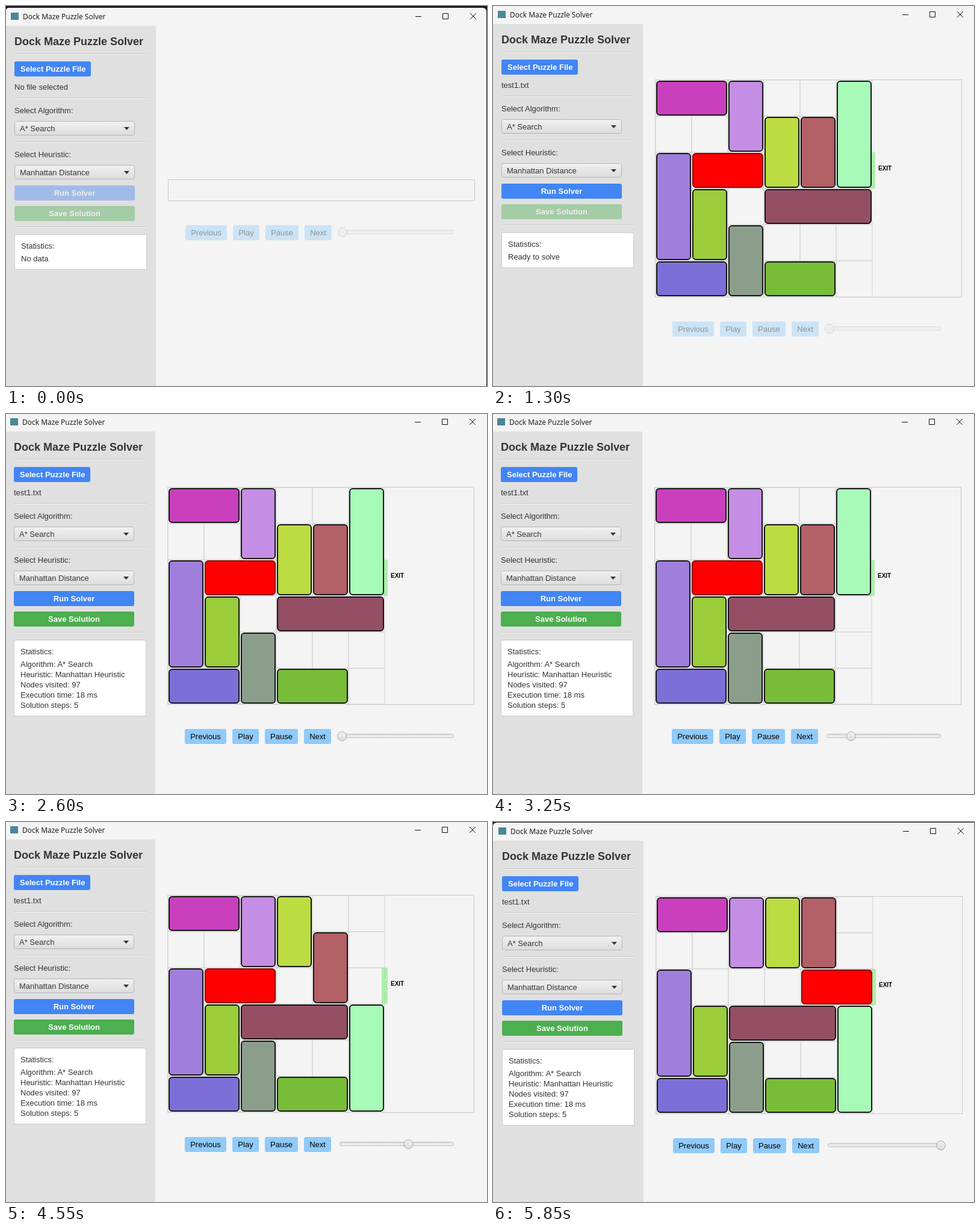
Recreate the animation shown at these times as an HTML page. Size 799 px wide and 631 px high, loop 6.5 s.

```html
<!DOCTYPE html>
<html lang="en">
<head>
<meta charset="utf-8">
<title>Dock Maze Puzzle Solver</title>
<style>
  html, body { margin: 0; width: 100%; height: 100%; overflow: hidden; background: #1d1c24; }
  svg { display: block; font: 13px "Liberation Sans", Arial, sans-serif; fill: #333; }
  .caption { font: 12px "Open Sans", "Noto Sans", sans-serif; fill: #111; }
  .bold { font-weight: bold; }
  .white { fill: #fff; }
  .mid { text-anchor: middle; }
</style>
</head>
<body>
<svg id="stage" width="799" height="631" viewBox="0 0 799 631">
  <defs>
    <linearGradient id="raised" x2="0" y2="1">
      <stop stop-color="#f1f1f1"/><stop offset="1" stop-color="#dcdcdc"/>
    </linearGradient>
    <linearGradient id="sunken" x2="0" y2="1">
      <stop stop-color="#dedede"/><stop offset="1" stop-color="#f2f2f2"/>
    </linearGradient>
    <filter id="shadow" x="-10%" y="-20%" width="120%" height="160%">
      <feDropShadow dx="0" dy="3" stdDeviation="4" flood-opacity=".4"/>
    </filter>
  </defs>
  <g id="view"></g>
</svg>
<script>
const STEP_MS = 650;
const APP_NAME = "Dock Maze Puzzle Solver";

// The recorded window wobbles by a few pixels: dx, dy per step.
// "move" is how many solution moves are on the board.
const states = [
  { dx: 1, dy: 4, empty: true, right: 798 },
  { dx: 3, dy: 2 },
  { dx: 1, dy: 1 },
  { dx: -1, dy: 1, menu: true },
  { dx: 0, dy: 0, move: 0 },
  { dx: 0, dy: 0, move: 1 },
  { dx: 0, dy: 0, move: 2 },
  { dx: 0, dy: 0, move: 3 },
  { dx: -1, dy: 1, move: 4 },
  { dx: 2, dy: 2, move: 5 }
];

// column, row, columns wide, rows high, colour
const cars = {
  magenta: [0, 0, 2, 1, "#c93fbe"],
  lilac: [2, 0, 1, 2, "#c38ee3"],
  lime: [3, 1, 1, 2, "#bcdc42"],
  brick: [4, 1, 1, 2, "#b46067"],
  mint: [5, 0, 1, 3, "#a8fab8"],
  violet: [0, 2, 1, 3, "#a07edc"],
  red: [1, 2, 2, 1, "#ff0000"],
  olive: [1, 3, 1, 2, "#9bcc3c"],
  maroon: [3, 3, 3, 1, "#944f64"],
  sage: [2, 4, 1, 2, "#8b9e8b"],
  blue: [0, 5, 2, 1, "#7c70d8"],
  green: [3, 5, 2, 1, "#78bd38"]
};
const moves = [["maroon", -1, 0], ["mint", 0, 3], ["lime", 0, -1], ["brick", 0, -1], ["red", 3, 0]];

const rect = (x, y, w, h, fill, extra = "") =>
  `<rect x="${x}" y="${y}" width="${w}" height="${h}" fill="${fill}" ${extra}/>`;
const text = (x, y, str, cls = "", extra = "") =>
  `<text x="${x}" y="${y}" class="${cls}" ${extra}>${str}</text>`;
const group = (content, attrs) => `<g ${attrs}>${content}</g>`;
const dim = (content, disabled) => group(content, `opacity="${disabled ? 0.4 : 1}"`);
const separator = y => rect(13, y, 221, 1, "#cacaca") + rect(13, y + 1, 221, 1, "#f4f4f4");

const wideButton = (y, label, fill, disabled) =>
  dim(rect(13, y, 200, 25, fill, 'rx="3"') + text(113, y + 17, label, "bold white mid"), disabled);

const comboBox = (y, label, focused) =>
  rect(13.5, y + .5, 199, 23, "url(#raised)",
    `rx="3" stroke="${focused ? "#039ed3" : "#b4b4b4"}" stroke-width="${focused ? 1.6 : 1}"`) +
  text(22, y + 17, label) +
  `<path d="M195 ${y + 10}h9l-4.5 5z"/>`;

function titleBar() {
  return rect(7, 7, 13, 12, "#4b8797") +
    text(27, 18, APP_NAME, "caption") +
    `<path d="M679 13.5h10M724.5 8.5h9v9h-9zM770 8l10 10M780 8l-10 10" fill="none" stroke="#111"/>`;
}

function statistics({ empty, move }) {
  const solved = move !== undefined;
  const lines = solved
    ? ["Algorithm: A* Search", "Heuristic: Manhattan Heuristic", "Nodes visited: 97",
       "Execution time: 18 ms", "Solution steps: 5"]
    : [empty ? "No data" : "Ready to solve"];
  return rect(13.5, 375.5, 219, solved ? 126 : 58, "#fff", 'stroke="#ccc"') +
    text(24, 399, "Statistics:") +
    lines.map((line, i) => text(24, 420 + 17 * i, line)).join("");
}

function menu() {
  return group(rect(13, 284, 199, 50, "#fff", 'stroke="#bcbcbc" stroke-width=".6"'), 'filter="url(#shadow)"') +
    rect(13, 285, 198, 24, "#0096c9") +
    text(19, 302, "Manhattan Distance", "white") +
    text(19, 326, "Blocking Cars");
}

function sidebar(state) {
  return rect(-9, 29, 257, 640, "#e0e0e0") +
    text(13, 61, APP_NAME, "bold", 'font-size="18"') +
    separator(75) +
    rect(13, 88, 127, 25, "#4285f4", 'rx="3"') +
    text(23, 105, "Select Puzzle File", "bold white") +
    text(13, 135, state.empty ? "No file selected" : "test1.txt") +
    separator(148) +
    text(13, 174, "Select Algorithm:") +
    comboBox(187, "A* Search") +
    separator(221) +
    text(13, 247, "Select Heuristic:") +
    comboBox(260, "Manhattan Distance", state.menu) +
    wideButton(294, "Run Solver", "#4285f4", state.empty) +
    wideButton(328, "Save Solution", "#4caf50", state.move === undefined) +
    separator(362) +
    statistics(state) +
    (state.menu ? menu() : "");
}

function board({ empty, move = 0 }) {
  const frame = 'stroke="#c8c8c8"';
  if (empty) return rect(268.5, 284.5, 509, 35, "none", frame);
  const cell = n => 60 * n;
  let out = rect(268.5, 121.5, 509, 361, "none", frame);
  for (let i = 0; i < 36; i++)
    out += rect(269 + cell(i % 6), 122 + cell(Math.floor(i / 6)), 60, 60, "none", 'stroke="#d3d3d3"');
  out += rect(624, 242, 10, 60, "#90ee90", 'opacity=".7"') +
    text(639, 272, "EXIT", "bold", 'font-size="10" style="fill:#000"');
  for (const [name, [col, row, w, h, fill]] of Object.entries(cars)) {
    let x = col, y = row;
    for (const [mover, dx, dy] of moves.slice(0, move))
      if (mover === name) { x += dx; y += dy; }
    const edge = name === "red" ? "#8b0000" : "#161616";
    out += rect(271 + cell(x), 124 + cell(y), cell(w) - 4, cell(h) - 4, fill,
      `rx="5" stroke="${edge}" stroke-width="2"`);
  }
  return out;
}

function controls({ empty, move }) {
  const button = (x, w, label) =>
    rect(x, 523, w, 25, "#90caf9", 'rx="3"') + text(x + w / 2, 540, label, "mid", 'style="fill:#000"');
  const knobX = 558 + 36.8 * (move || 0);
  const content = button(297, 69, "Previous") + button(376, 44, "Play") +
    button(430, 55, "Pause") + button(495, 45, "Next") +
    rect(554.5, 531.5, 189, 6, "url(#sunken)", 'rx="3" stroke="#bcbcbc"') +
    `<circle cx="${knobX}" cy="535" r="7.5" fill="url(#raised)" stroke="#a8a8a8"/>`;
  return group(dim(content, move === undefined), `transform="translate(0 ${empty ? -163 : 0})"`);
}

function render(state) {
  const left = state.dx - 2, top = state.dy - 1, right = state.right || 810;
  return rect(left, top, right - left, 660, "#f4f4f4", 'rx="6"') +
    (left < 0 ? rect(0, Math.max(top, 0) + 6, 6, 640, "#f4f4f4") : "") +
    (top < 1 ? rect(0, 0, 799, 12, "#f4f4f4") : "") +
    group(titleBar() + sidebar(state) + board(state) + controls(state),
      `transform="translate(${state.dx} ${state.dy})"`) +
    (left > 0 ? rect(0, 0, left, 631, "#1d1c24") : "");
}

const view = document.getElementById("view");
const start = performance.now();
let shown = -1;
function tick() {
  const index = Math.floor((performance.now() - start) / STEP_MS) % states.length;
  if (index !== shown) view.innerHTML = render(states[shown = index]);
  requestAnimationFrame(tick);
}
tick();
</script>
</body>
</html>
```
